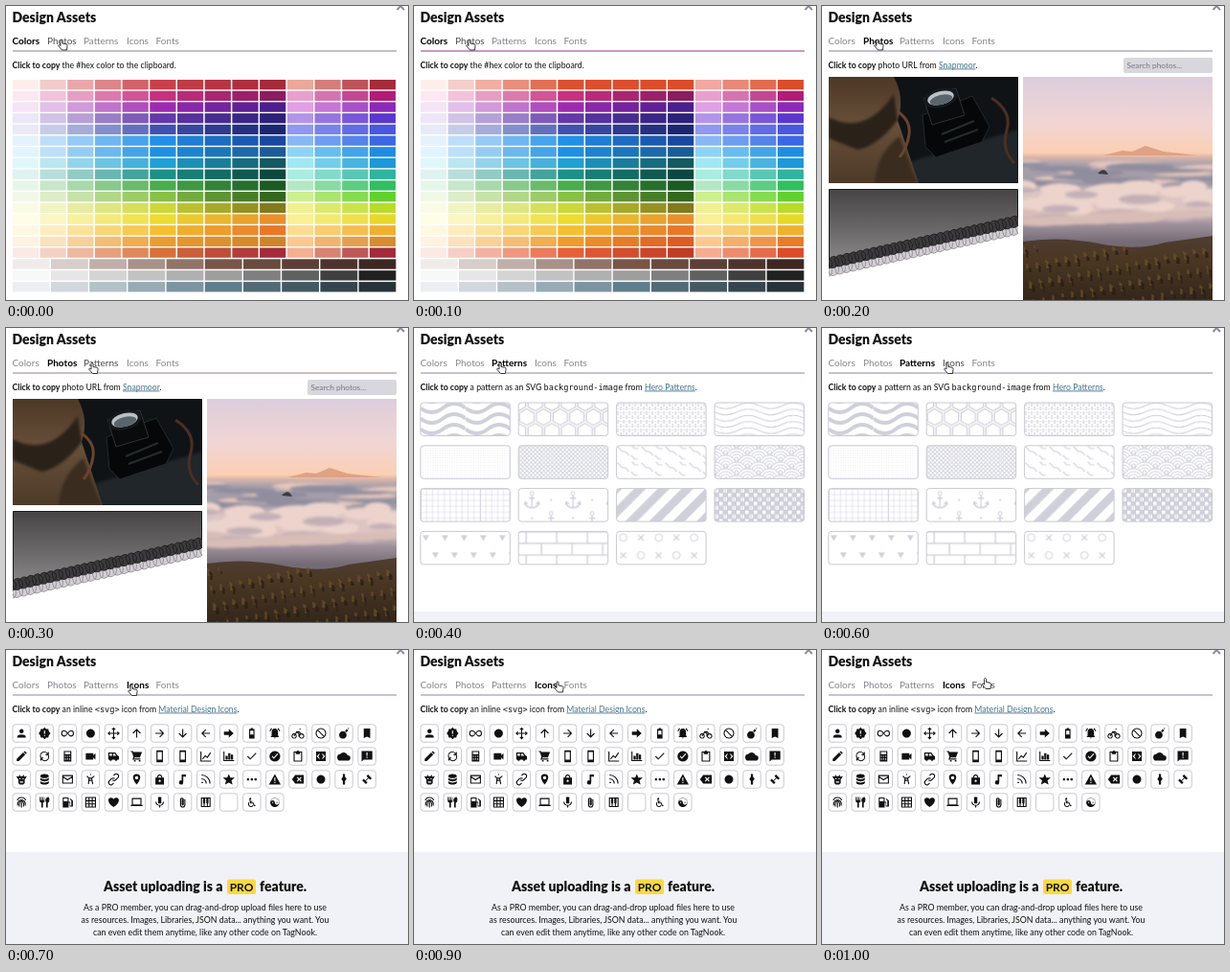
These frames come from a looping animation (420x307 px, 1100 ms). An HTML page:

```html
<!DOCTYPE html>
<html lang="en">
<head>
<meta charset="utf-8">
<title>Design Assets</title>
<style>
html, body { margin: 0; height: 100%; overflow: hidden; background: #fff; }
#stage { display: block; width: 100vw; height: 100vh; font: 8.7px Lato, sans-serif; fill: #111; }
.head { font-weight: 900; font-size: 14px; }
.tab { font-size: 10px; fill: #85858b; }
.tab.hover { fill: #4a4a50; }
.tab.active { fill: #000; font-weight: 700; }
.code { font-family: "DejaVu Sans Mono", monospace; font-size: 8.6px; }
.link { fill: #47758c; text-decoration: underline #a3b7c3; }
.bold { font-weight: 700; }
.glyph { font: 13px "DejaVu Sans", sans-serif; text-anchor: middle; }
.line { fill: none; stroke: #111; stroke-width: 2; }
.soft { filter: blur(1.6px); }
</style>
</head>
<body>
<svg id="stage" viewBox="0 0 420 307" preserveAspectRatio="none"></svg>
<script>
const stage = document.getElementById('stage');
const rect = (x, y, w, h, fill, more = '') =>
  `<rect x="${x}" y="${y}" width="${w}" height="${h}" style="fill:${fill}" ${more}/>`;
const path = (d, fill, stroke = 'none', width = 1, more = '') =>
  `<path d="${d}" fill="${fill}" stroke="${stroke}" stroke-width="${width}" ${more}/>`;
const oval = (x, y, rx, ry, fill, more = '') =>
  `<ellipse cx="${x}" cy="${y}" rx="${rx}" ry="${ry}" fill="${fill}" ${more}/>`;
const text = (x, y, body, cls = '', more = '') =>
  `<text x="${x}" y="${y}" class="${cls}" ${more}>${body}</text>`;
const span = (cls, body) => `<tspan class="${cls}">${body}</tspan>`;
const intro = rest => text(6.5, 64.5, span('bold', 'Click to copy') + ' ' + rest);
const range = n => [...Array(n).keys()];
const mix = (a, b, k) => `color-mix(in srgb, #${b} ${k * 100}%, #${a})`;

// Colors: light, main, dark, light accent, strong accent
const hues = `fdeeee dc5030 dc4c28 f0a8a0 dc4c28
fce8f0 c83080 8a1c60 e8a0cc b01c78
f4e4f6 9c2ab0 4a1e8c e0a0e4 8c28b8
ece6f6 6438a8 2c2078 b494e8 5a38d0
e8eaf6 4050b0 1c2670 9098f0 4858e0
e4f2fd 2090e8 1848a0 88b8f4 3a68e4
e2f4fe 1e90e4 1a5c98 8cd4f6 1e8ce4
e0f7fa 20a0d4 145a60 a0e8f4 1e98d8
e0f2f0 1a9088 0c4840 a8eee0 30b4a0
e8f5e9 4aac4c 1c5a24 b4e8c4 30c060
f1f8e8 88c048 34681e ccf090 64d030
f9fbe6 ccd838 827a1c f0f090 b8dc28
fffde6 ecdc30 e8902c faf094 e8d828
fff8e0 f4c030 e87828 fcdc90 f0b030
fff2e0 ee9c2c dc5c24 fcc890 e87c28
fbe9e6 e86038 c03c24 f6ac90 dc4c28`.split('\n').map(row => row.split(' '));
const darkReds = {
  0: 'fdeeea c8404a a52a3a eaa898 a52a3a',
  14: 'fff2e0 ea9c30 d08428 fcc890 d88c30',
  15: 'fbe9e6 d87038 a52a3a f4b090 a52a3a'
};
const neutrals = ['efebe9 795548 3e2723', 'f8f8f8 9e9e9e 212121', 'eceff1 607d8b 263238'];
const shade = ([light, main, dark], i) =>
  i < 5 ? mix(light, main, i / 5) : mix(main, dark, (i - 5) / 4);

function colors(changes) {
  let out = intro('the #hex color to the clipboard.');
  hues.forEach((hue, r) => {
    const row = changes[r] ? changes[r].split(' ') : hue;
    for (const c of range(14)) {
      const fill = c < 10 ? shade(row, c) : mix(row[3], row[4], (c - 10) / 3);
      out += rect(6.8 + c * 28.7, 77 + r * 11.7, 27.2, 10.3, fill);
    }
  });
  neutrals.forEach((row, r) => range(10).forEach(c => {
    out += rect(6.8 + c * 40.2, 264.3 + r * 11.9, 38.8, 10.4, shade(row.split(' '), c));
  }));
  return out;
}

// Photos
const photo = (x, y, w, h, body) => `<svg x="${x}" y="${y}" width="${w}" height="${h}">${body}</svg>`;
const gradient = (id, ...stops) => `<linearGradient id="${id}" x2="0" y2="1">` +
  stops.map(([at, color]) => `<stop offset="${at}" stop-color="${color}"/>`).join('') + '</linearGradient>';

function photos() {
  const camera = rect(0, 0, 198, 111, '#0f1316') +
    path('M80 90L198 55V111H80z', '#20262a', 'none', 0, 'class="soft"') +
    path('M0 0H68Q80 22 72 45L94 111H0z', 'url(#leather)') +
    path('M0 42Q38 62 68 18L72 45Q52 72 30 76L0 64z', '#2a2119', 'none', 0, 'class="soft"') +
    path('M48 111Q50 80 74 62L92 111z', '#3a2c1f', 'none', 0, 'class="soft"') +
    path('M72 36Q86 46 84 60T74 84', 'none', '#6b432c', 3) +
    path('M170 22Q192 36 186 56T194 90', 'none', '#4a3022', 3) +
    path('M98 40L150 20 168 52 160 68 112 84 101 73z', '#050708', '#23292d') +
    path('M99 22L133 12 142 40 108 50z', '#090b0c', '#2d3338') +
    `<g transform="rotate(-14 117 22)">${oval(117, 22, 18, 10, '#15191c')}${oval(117, 22, 14, 7, '#b9c1c6')}` +
    `${oval(117, 24, 12, 5, '#59646b')}</g>` +
    path('M118 60l34-14M121 68l35-13', 'none', '#262c30', 2);
  const strand = (y, fill, edge) => path(range(32).map(i =>
    `M${i * 7 - 8} ${y + 2 - i * 1.56}q5-6 9-3t2 8q-5 5-9 2z`).join(''), fill, edge, .8);
  const rope = rect(0, 0, 198, 116, '#fff') +
    path('M.5.5H197.5V34L.5 80z', 'url(#steel)', '#1c1b1c') +
    strand(82, '#d2ced4', '#89868c') + strand(74, '#3c3a3d', '#18171a');
  const clouds = (n, top, height, rx, ry, fill) => range(n).map(i =>
    oval(i * 61 % 205, top + i * 37 % height, rx + i * 5 % 13, ry + i % 3, fill)).join('');
  const trees = range(150).map(i => {
    const h = 3 + i * 7 % 6;
    return `M${i * 47 % 198} ${176 + i * 29 % 57}v${h}`;
  }).join('');
  const sunset = rect(0, 0, 198, 233, 'url(#sky)') +
    path('M84 82L104 77 114 78 128 72 147 78 182 82z', '#e0a184') +
    '<g class="soft">' +
    clouds(14, 88, 26, 20, 1.5, '#e6c6bb') + clouds(9, 92, 24, 26, 2, '#8f8d9e') +
    clouds(16, 114, 24, 14, 6, '#ecd3cb') + clouds(7, 118, 32, 12, 3, '#c3b0b6') +
    clouds(9, 142, 10, 18, 4, '#d8bdb6') + '</g>' +
    path('M78 101q7-8 11 1z', '#40383f') +
    path('M0 172Q38 166 79 174T148 173L198 166V233H0z', 'url(#hill)') +
    path(trees, 'none', '#6d5129', 1) + path(trees, 'none', '#271d15', 1, 'transform="translate(3 4)"');
  return '<defs>' + gradient('steel', [0, '#474546'], [.5, '#686666'], [1, '#8d8b8b']) +
    gradient('leather', [0, '#4c3826'], [.45, '#68503a'], [1, '#4d3a28']) +
    gradient('hill', [0, '#4e3d33'], [.35, '#4b3723'], [1, '#33271a']) +
    gradient('sky', [0, '#dccddd'], [.2, '#f1d5d4'], [.34, '#fbcfb2'], [.36, '#d9b5aa'],
      [.39, '#aaa0ab'], [.48, '#a09aa7'], [.52, '#dcc5c2'], [.6, '#dcc5c3'], [.66, '#9f929d'], [.74, '#756b75']) +
    '</defs>' +
    intro('photo URL from ' + span('link', 'Snapmoor') + '.') +
    rect(315, 54, 93, 16, '#d7d7dd', 'rx="2"') +
    text(318.5, 65, 'Search photos...', '', 'style="font-size:8.3px;fill:#777780"') +
    photo(7, 74, 198, 111, camera) + photo(7, 191, 198, 116, rope) + photo(210, 74, 198, 233, sunset);
}

// Patterns: tile width, tile height, content
const ink = '#d0d0db';
const lines = (d, width = 1) => path(d, 'none', ink, width);
const waves = (w, h, bend, width) => [w, h, lines([-1, 0, 1].map(i =>
  `M0 ${h / 2 + i * h}q${w / 4} ${bend} ${w / 2} 0t${w / 2} 0`).join(''), width)];
const ring = (x, y, r, fill = 'none') =>
  `<circle cx="${x}" cy="${y}" r="${r}" fill="${fill}" stroke="${ink}"/>`;
const scales = range(5).map(row => [0, 1, 2].map(col =>
  [11, 8, 5, 2].map(r => ring((col - row % 2 / 2) * 23, row * 7, r, '#fff')).join('')).join('')).join('');
const anchor = (x, y) => `<g transform="translate(${x} ${y})">` + ring(0, -7, 2) +
  lines('M0-5V8M-3-2H3M-7 3Q-6 8 0 8T7 3M-8 5l1-3 3 2M8 5l-1-3-3 2', 1.3) + '</g>';
const hexagons = 'M14 10.4l12 6.9v13.9l-12 6.9-12-6.9v-13.9zM12 0v6.9L0 13.8M0 34.7l12 6.9V49' +
  'M16 0v6.9l12 6.9M28 34.7l-12 6.9V49';
const tiles = [
  waves(47, 11, 9, 4),
  [17.4, 30.4, `<g transform="scale(.62)">${lines(hexagons, 2)}</g>`],
  [6, 9, lines('M1.5 0v4M1.5 6v1M4.5 4v4M4.5 1v1', 1.3)],
  waves(47, 6.5, 6, 1),
  [2.5, 2.5, rect(0, 0, 1, 1, '#ececf0')],
  [4.4, 4.4, lines('M0 0l4.4 4.4M4.4 0L0 4.4', .9)],
  [25, 17, lines('M1 1l5 5h3l4 4M15 10l4 4h3M16 0l3 3h4', 1.2)],
  [23, 14, scales],
  [62, 62, lines('M0 .5h62M.5 0v62') +
    lines(range(9).map(i => `M0 ${i * 6.2 + 6.2}h62M${i * 6.2 + 6.2} 0v62`).join(''), .5)],
  [43, 38, anchor(14, 12) + anchor(34, 33) + ring(34, 12, .8) + ring(14, 31, .8)],
  [24.8, 24.8, lines('M-6 6L6-6M0 24.8L24.8 0M18.8 30.8l12-12', 8.8)],
  [9, 9, rect(0, 0, 9, 9, ink) + rect(.5, .5, 3.5, 3.5, '#fff') + rect(5, 5, 3.5, 3.5, '#fff') +
    rect(1.5, 1.5, 1.5, 1.5, ink)],
  [20, 36, path('M2 4h7l-3.5 6zM12 22h7l-3.5 6z', ink)],
  [32, 24, lines('M0 .5h32M0 12.5h32M8 0v12M24 12v12', 1.3)],
  [37, 36, ring(7, 6.5, 3.8) + ring(25.5, 25, 3.8) + lines('M22.5 3.5l6 6M28.5 3.5l-6 6M4 22l6 6M10 22l-6 6', 1.2)]
];

function patterns() {
  return intro('a pattern as an SVG ' + span('code', 'background-image') + ' from ' +
    span('link', 'Hero Patterns') + '.') +
    tiles.map(([w, h, body], i) => {
      const x = 6.8 + i % 4 * 102.4, y = 78 + (i >> 2) * 44.8;
      return `<pattern id="p${i}" width="${w}" height="${h}" patternUnits="userSpaceOnUse"
        patternTransform="translate(${x} ${y})">${body}</pattern>` +
        rect(x, y, 93.5, 34.5, `url(#p${i})`, 'rx="3" stroke="#c9c9d1"');
    }).join('') + rect(0, 296, 420, 11, '#f1f2f7');
}

// Icons on a 24-unit grid; "~" marks outlines, "@" marks glyphs
const disc = 'M12 4a8 8 0 1 0 .01 0z';
const phone = 'M6 1h12v22H6zM8 4v14h8V4z';
const people = ['M12 4a4 4 0 1 1-.01 0M4 20v-2c0-5 16-5 16 0v2z',
  'M12 1l3 3h4l1 4 3 4-3 4-1 4h-4l-3 3-3-3H5l-1-4-3-4 3-4 1-4h4zM11 7v6h2V7zM11 15v2h2v-2z',
  '~M12 12c-3-4-4-5-6-5a5 5 0 0 0 0 10c2 0 3-1 6-5s4-5 6-5a5 5 0 0 1 0 10c-2 0-3-1-6-5', disc,
  '~M12 2v20M2 12h20M9 5l3-3 3 3M9 19l3 3 3-3M5 9l-3 3 3 3M19 9l3 3-3 3',
  '~M12 20V5M5 12l7-7 7 7', '~M4 12h15M12 5l7 7-7 7', '~M12 4v15M5 12l7 7 7-7', '~M20 12H5M12 5l-7 7 7 7',
  'M3 9h9V4l9 8-9 8v-5H3z', 'M7 4h3V2h4v2h3v18H7zM9 7v7h6V7z',
  'M12 3c5 0 6 4 6 8v5l2 3H4l2-3v-5c0-4 1-8 6-8M10 20h4l-2 2zM5 2L2 8h2l3-5zM19 2l3 6h-2l-3-5z',
  '~M5 13a4 4 0 1 0 .01 0M19 13a4 4 0 1 0 .01 0M5 17l5-8 4 4v5M10 9h4l3 3M15 4h2',
  '~M12 3a9 9 0 1 0 .01 0M6 6l12 12', 'M10 8a7 7 0 1 0 .01 0M14 8l3-4 3 3-4 3zM19 2h2v2h-2z',
  'M6 3h12v18l-6-3-6 3z'];
const tools = ['M3 21v-4L15 5l4 4L7 21zM16 4l2-2 4 4-2 2z',
  '~M5 14A7 7 0 0 1 18 8M19 4v5h-5M19 10A7 7 0 0 1 6 16M5 20v-5h5',
  'M5 2h14v20H5zM7 4v4h10V4zM7 11v2h2v-2zM11 11v2h2v-2zM15 11v2h2v-2zM7 16v2h2v-2zM11 16v2h2v-2zM15 16v2h2v-2z',
  'M3 6h14v4l4-4v12l-4-4v4H3z',
  'M2 5h13l5 6 2 1v6h-3a2.5 2.5 0 0 1-5 0H9a2.5 2.5 0 0 1-5 0H2zM4 7v4h5V7zM11 7v4h6l-3-4z',
  'M1 2h4l1 2h16l-4 10H8l-1 2h12v2H4l2-5-3-9H1zM7 19h3v3H7zM16 19h3v3h-3z', phone, phone,
  '~M3 3v18h19M6 17l5-6 4 3 6-9', 'M2 3h2v16h18v2H2zM6 11h4v7H6zM11 6h4v12h-4zM16 9h4v9h-4z',
  '~M4 12l5 5L20 6', 'M12 2a10 10 0 1 0 .01 0M6 12l4 5 8-9-1.5-1.5L10 14l-2.5-3z',
  'M4 3h5l3-2 3 2h5v19H4zM6 5v15h12V5h-2v3H8V5z',
  'M3 3h18v18H3zM10 8L9 7l-5 5 5 5 1-1-3-4zM14 8l1-1 5 5-5 5-1-1 3-4z',
  'M6 20a6 6 0 0 1-1-12 8 8 0 0 1 14 2 5 5 0 0 1 0 10z', 'M2 2h20v16H6l-4 4zM11 5v6h2V5zM11 13v2h2v-2z'];
const signs = ['M2 6l5 1 1-4 2 3h4l2-3 1 4 5-1-3 5-1 1v7l-3 3H9l-3-3v-7L5 11zM8 10v2h2v-2zM14 10v2h2v-2zM9 16v2h6v-2z',
  'M4 6c0-5 16-5 16 0s-16 5-16 0M4 9c3 4 13 4 16 0v4c-3 4-13 4-16 0zM4 15c3 4 13 4 16 0v4c-3 4-13 4-16 0z',
  '~M3 5h18v14H3zM3 7l9 6 9-6', '~M11 3h2M5 6l4 4h5l5-4M9 10L8 21M14 10l2 11M9 14h6',
  '~M10 13a4 4 0 0 0 6 0l4-4a4 4 0 0 0-6-6l-2 2M14 11a4 4 0 0 0-6 0l-4 4a4 4 0 0 0 6 6l2-2',
  'M12 2c9 0 9 9 0 20C3 11 3 2 12 2M12 6a3 3 0 1 0 .01 0z',
  'M4 9h3C7 1 17 1 17 9h3v13H4zM9 9h6c0-5-6-5-6 0zM12 13a2 2 0 1 0 .01 0z',
  'M10 3h8v4h-5v11a4 4 0 1 1-3-4z', '~M4 11a9 9 0 0 1 9 9M4 4a16 16 0 0 1 16 16M4 18h3',
  'M12 2l3 7h8l-6 5 2 8-7-4-7 4 2-8-6-5h8z', 'M3 10h4v4H3zM10 10h4v4h-4zM17 10h4v4h-4z',
  'M12 2l11 20H1zM11 9v6h2V9zM11 17v2h2v-2z',
  'M7 4h16v16H7l-6-8zM10 9l3 3-3 3 1.5 1.5 3-3 3 3L19 15l-3-3 3-3-1.5-1.5-3 3-3-3z', disc,
  'M10 2h4v5l3 4-3 4v7h-4v-7l-3-3 3-5z', 'M3 14l3-3 3 3 5-5-3-3 3-3 7 7-3 3-3-3-5 5 3 3-3 3z'];
const things = ['~M4 8a9 9 0 0 1 16 0M5 18c-2-14 16-14 14 0M8 20c-2-14 10-14 8 0M12 11v11',
  'M3 2h2v6h2V2h2v6h2V2h1v9l-3 2v9H6v-9l-3-2zM19 2c3 0 3 10-1 11v9h-3V12c-3-4 0-10 4-10',
  'M3 3h11v8h3v7h2V9l-3-3 1-1 5 4v11h-6v-7h-2v9H3zM5 5v5h7V5z',
  '~M3 3h18v18H3zM3 9h18M3 15h18M9 3v18M15 3v18', 'M12 21C-6 9 5-2 12 6c7-8 18 3 0 15',
  'M3 4h18v13h2v2H1v-2h2zM5 6v10h14V6z',
  'M9 2h6v12H9zM4 11h2c0 8 12 8 12 0h2c0 5-3 7-7 7v4h-2v-4c-4 0-7-2-7-7',
  '~M16 6v11a4 4 0 0 1-8 0V6a3 3 0 0 1 5 0v10a1 1 0 0 1-2 0V7',
  'M3 3h18v18H3zM5 5v14h3v-5H7V5zM10 14v5h4v-5h-1V5h-2v9zM17 5v9h-1v5h3V5z', '', '@♿\uFE0E', '@☯\uFE0E'];

function icon(d, x, y) {
  if (d[0] === '@') return text(x, y + 4.7, d.slice(1), 'glyph');
  const outline = d[0] === '~';
  return `<path d="${outline ? d.slice(1) : d}" fill-rule="evenodd" class="${outline ? 'line' : ''}"
    transform="translate(${x - 6.7} ${y - 6.7}) scale(.56)"/>`;
}

function icons() {
  const center = 'text-anchor="middle" style="font-size:8.8px"';
  return intro('an inline ' + span('code', '&lt;svg&gt;') + ' icon from ' +
    span('link', 'Material Design Icons') + '.') +
    [people, tools, signs, things].map((row, r) => row.map((d, c) => {
      const x = 16.2 + c * 24.06, y = 87 + r * 24;
      return rect(x - 9.2, y - 9.2, 18.4, 18.4, '#fff', 'rx="3" stroke="#c9c9cf"') + icon(d, x, y);
    }).join('')).join('') +
    rect(0, 211, 420, 96, '#f1f2f7') + rect(231, 239.5, 30, 15.5, '#fcd93d', 'rx="2"') +
    text(102, 251.5, 'Asset uploading is a', 'head') +
    text(246, 251.5, 'PRO', 'bold', 'text-anchor="middle" style="font-size:12px"') +
    text(265, 251.5, 'feature.', 'head') +
    text(208, 272, 'As a PRO member, you can drag-and-drop upload files here to use', '', center) +
    text(208, 285, 'as resources. Images, Libraries, JSON data... anything you want. You', '', center) +
    text(208, 298, 'can even edit them anytime, like any other code on TagNook.', '', center);
}

const scenes = [colors(darkReds), colors({}), photos(), patterns(), icons()];
const tabs = [['Colors', 6.5], ['Photos', 43], ['Patterns', 81], ['Icons', 126], ['Fonts', 156.5]];
stage.innerHTML = rect(0, 0, 420, 307, '#fff') +
  scenes.map(body => `<g class="scene">${body}</g>`).join('') +
  text(6.5, 16.8, 'Design Assets', 'head') +
  tabs.map(([name, x]) => text(x, 39.8, name, 'tab')).join('') +
  rect(7, 46.3, 401, 1.4, '#a9a9c9', 'id="rule"') +
  path('M408.5-4l7.5 8M416-4l-7.5 8', 'none', '#8e8ea0', 2) +
  path('M-2-5c0-1.5 2-1.5 2 0v3l4 .8c1 .2 1.2 1 1 2L4.5 5h-5L-4 1c-1-1 .5-2 2-.5z',
    '#fff', '#222', .9, 'id="hand"');

const groups = stage.querySelectorAll('.scene');
const labels = stage.querySelectorAll('.tab');
const rule = document.getElementById('rule');
const hand = document.getElementById('hand');

// Each entry holds from its start time: scene, active tab, rule colour
const views = [[0, 0, 0, '#a5a9a4'], [100, 1, 0, '#b46cb4'], [200, 2, 1, '#a8a4c8'],
  [300, 2, 1, '#c0a0a6'], [400, 3, 2, '#a9a9c9'], [700, 4, 3, '#a9a9c9']];
// Start time, pointer position, hovered tab
const moves = [[0, 59, 41, 1], [300, 91, 42.5, 2], [600, 132, 42.5, 3], [900, 151, 39, -1], [1000, 171.5, 35.5, 4]];
const at = (list, t) => list.findLast(entry => entry[0] <= t);

function draw() {
  const t = performance.now() % 1100;
  const [, scene, active, color] = at(views, t);
  const [, x, y, hover] = at(moves, t);
  groups.forEach((g, i) => g.style.display = i === scene ? '' : 'none');
  labels.forEach((label, i) => {
    label.classList.toggle('active', i === active);
    label.classList.toggle('hover', i === hover);
  });
  rule.style.fill = color;
  hand.setAttribute('transform', `translate(${x} ${y})`);
  requestAnimationFrame(draw);
}
draw();
</script>
</body>
</html>
```
